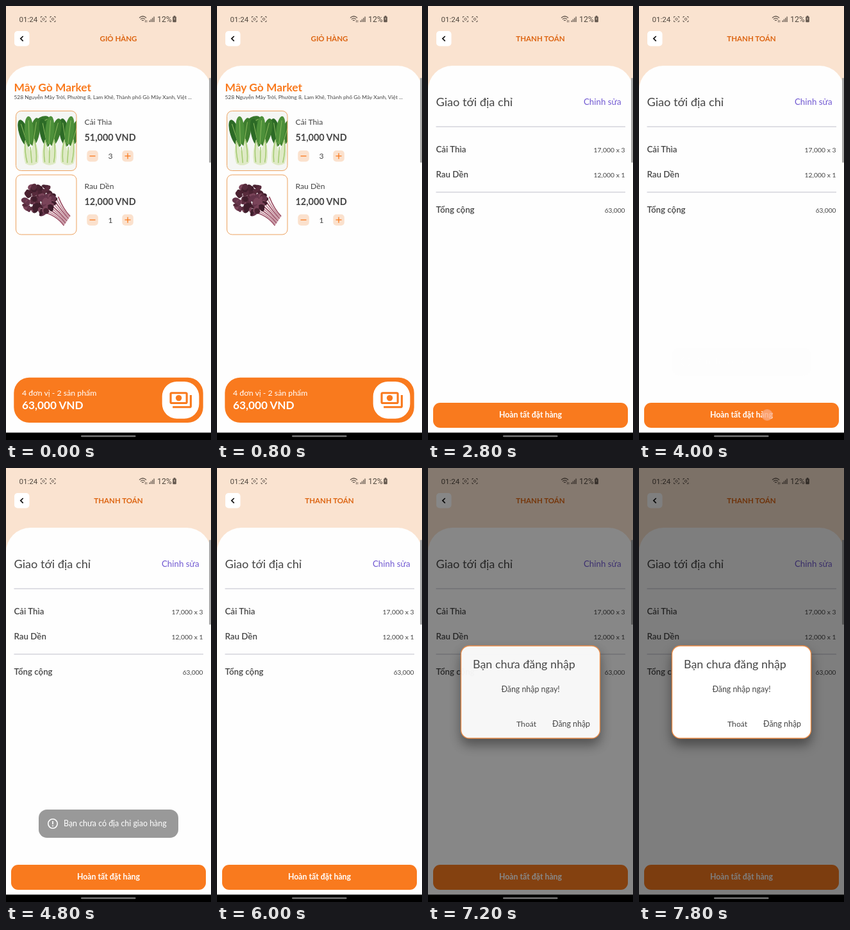
Recreate the animation shown at these times as an HTML page. Size 320 by 676 pixels, loop 8 s.

```html
<!DOCTYPE html>
<html lang="vi">
<head>
<meta charset="utf-8">
<title>Giỏ hàng</title>
<style>
  html, body { margin: 0; width: 100%; height: 100%; overflow: hidden; background: #000; }
  svg { display: block; width: 100vw; height: 100vh; }
  text { font-family: Lato, "Noto Sans", sans-serif; fill: #454545; }
  .status text { font-family: Roboto, sans-serif; fill: #51483f; }
  #dialog { filter: drop-shadow(0 10px 9px rgba(0, 0, 0, .42)); }
</style>
</head>
<body>
<svg id="stage" viewBox="0 0 320 676" preserveAspectRatio="none"></svg>
<script>
const LOOP = 8000;
const ORANGE = '#f97a1e', PEACH = '#fae3d0', TITLE = '#dd6512';

const rect = (x, y, w, h, r, fill, extra = '') =>
  `<rect x="${x}" y="${y}" width="${w}" height="${h}" rx="${r}" fill="${fill}" ${extra}/>`;
const line = (d, color, width, extra = '') =>
  `<path d="${d}" fill="none" stroke="${color}" stroke-width="${width}" ${extra}/>`;
const ellipse = (x, y, rx, ry, angle, fill) =>
  `<ellipse rx="${rx}" ry="${ry}" fill="${fill}" transform="translate(${x} ${y}) rotate(${angle})"/>`;

function label(str, x, y, size, { fill, weight = 400, anchor = 'start' } = {}) {
  const style = fill ? `style="fill:${fill}"` : '';
  return `<text x="${x}" y="${y}" font-size="${size}" font-weight="${weight}" text-anchor="${anchor}" ${style}>${str}</text>`;
}

function page(title, body) {
  return rect(0, 0, 320, 676, 0, PEACH) + rect(0, 93, 320, 640, 38, '#fefefe') +
    rect(13, 39, 23.5, 23.5, 5, '#fff') +
    line('M26.7 47 L22.8 50.8 L26.7 54.6', '#111', 1.7) +
    label(title, 175.5, 54.5, 11.5, { fill: TITLE, weight: 700, anchor: 'middle' }) + body;
}

function seeded(seed) {
  return () => (seed = (seed * 16807) % 2147483647) / 2147483647;
}

// Pictures are drawn inside a 95 x 93 box
function bokChoy() {
  const leaf = (x, y, rx, ry, angle, fill) => ellipse(x, y, rx, ry, angle, fill) +
    line(`M0 ${ry} V${-ry * .7}`, '#8bb95e', 1, `transform="translate(${x} ${y}) rotate(${angle})"`);
  const bunch = (x, lean) => `<g transform="translate(${x} 84) rotate(${lean})">` +
    leaf(-8, -50, 7.5, 22, -13, '#2c6a26') + leaf(9, -51, 7.5, 22, 14, '#3d7d2e') +
    leaf(0, -54, 7, 22, 3, '#4d903a') +
    '<path d="M-10 -3 Q-14 -20 -7 -40 Q-3 -24 0 -20 Q3 -26 7 -41 Q14 -20 10 -3 Q0 4 -10 -3Z" fill="#dfeac6"/>' +
    line('M-7 -4 Q-10 -22 -7 -38 M0 -3 V-28 M7 -4 Q10 -22 7 -38', '#a3ca70', 1.5) + '</g>';
  return rect(0, 0, 95, 93, 0, '#f5f6f4') + leaf(41, 17, 8, 13, 62, '#37772c') +
    bunch(25, -5) + bunch(80, 4) + bunch(52, 1);
}

function amaranth() {
  const rnd = seeded(73), tones = ['#4a2231', '#64344a', '#3f1d2b', '#7a4459', '#572a3b'];
  let out = '';
  for (let i = 0; i < 9; i++) {
    out += line(`M${42 + i * 3} ${58 - i * 3} Q${62 + i * 1.5} ${62 - i} ${75 + i * 1.2} ${79 - i * 1.8}`,
      i % 2 ? '#c28c99' : '#9a4c63', 1.7);
  }
  for (let i = 0; i < 85; i++) {
    const a = rnd() * 6.28, r = Math.sqrt(rnd());
    out += ellipse(36 + 24 * r * Math.cos(a), 39 + 23 * r * Math.sin(a),
      4 + 3 * rnd(), 2.5 + 2 * rnd(), rnd() * 180, tones[i % tones.length]);
  }
  return out;
}

function cartItem(y, name, price, count, picture) {
  const stepper = (x, d) => rect(x, y + 62, 17.5, 17.5, 5, '#fbe1cd') +
    line(d, ORANGE, 1.3, `transform="translate(${x + 8.7} ${y + 70.7})"`);
  return `<g transform="translate(15.5 ${y + .5})">` +
    `<g clip-path="url(#photo)">${picture}</g>` +
    rect(0, 0, 94.5, 93, 8, 'none', 'stroke="#eda361"') + '</g>' +
    label(name, 122.5, y + 22, 12.2) +
    label(price, 122.5, y + 47, 14.4, { weight: 700 }) +
    stepper(126.3, 'M-4.5 0 H4.5') + stepper(181.3, 'M-4.5 0 H4.5 M0 -4.5 V4.5') +
    label(count, 163, y + 75.3, 12.2, { anchor: 'middle' });
}

const banknotes = `<g transform="translate(253.9 594.9) scale(1.57)">` +
  rect(2, 5, 16, 10, 1, 'none', `stroke="${ORANGE}" stroke-width="2"`) +
  `<circle cx="10" cy="10" r="3" fill="${ORANGE}"/>` +
  line('M22 7 V18 Q22 19 21 19 H4', ORANGE, 2) + '</g>';

const cart = page('GIỎ HÀNG',
  label('Mây Gò Market', 12.5, 133, 17.4, { fill: ORANGE, weight: 700 }) +
  label('528 Nguyễn Mây Trời, Phường 8, Lam Khê, Thành phố Gò Mây Xanh, Việt ...', 12.5, 145.3, 8.4) +
  cartItem(163, 'Cải Thìa', '51,000 VND', 3, bokChoy()) +
  cartItem(262.5, 'Rau Dền', '12,000 VND', 1, amaranth()) +
  rect(12.3, 578.7, 295.4, 70.3, 24, ORANGE) +
  label('4 đơn vị - 2 sản phẩm', 25, 607, 12.3, { fill: '#fff' }) +
  label('63,000 VND', 25, 628, 17.2, { fill: '#fff', weight: 700 }) +
  rect(243.7, 585, 57.7, 57.7, 23, '#fff') + banknotes);

function summaryRow(name, amount, y, size) {
  return label(name, 12.5, y, 13.3, { weight: 600 }) +
    label(amount, 307.5, y - .5, size, { anchor: 'end' });
}

const checkout = page('THANH TOÁN',
  label('Giao tới địa chỉ', 12.5, 156, 18.2) +
  label('Chỉnh sửa', 301.5, 154, 13.3, { fill: '#7159d2', anchor: 'end' }) +
  line('M12.5 188 H308 M12.5 290 H308', '#d3d3dc', 1.3) +
  summaryRow('Cải Thìa', '17,000 x 3', 228, 10.4) +
  summaryRow('Rau Dền', '12,000 x 1', 267.3, 10.4) +
  summaryRow('Tổng cộng', '63,000', 322, 10.2) +
  rect(8, 618, 304, 39, 11, ORANGE) +
  label('Hoàn tất đặt hàng', 160, 641, 12.3, { fill: '#fff', weight: 700, anchor: 'middle' }));

function statusBar() {
  const ink = '#65594f';
  const capture = x => line('M-4 -2 V-4 H-2 M2 -4 H4 V-2 M4 2 V4 H2 M-2 4 H-4 V2', ink, 1, `transform="translate(${x} 20.5)"`) +
    `<circle cx="${x}" cy="20.5" r="1.7" fill="none" stroke="${ink}"/>`;
  const bars = [0, 1, 2, 3].map(i => rect(223.5 + i * 2.3, 22.5 - i * 2, 1.3, 2.5 + i * 2, 0, ink)).join('');
  return label('01:24', 20.5, 25, 11.6) + capture(58.5) + capture(73) +
    line('M208 18.5 Q213.5 13.5 219 18.5 M210 20.8 Q213.5 17.6 217 20.8 M212 22.8 Q213.5 21.4 215 22.8', ink, 1.2) +
    line('M217.5 22 V25.5 M219.7 25.5 V22', ink, .9) + bars +
    label('12%', 236, 24.8, 12.3) +
    rect(260.2, 16.5, 5.6, 8.8, 1, ink) + rect(261.7, 15.2, 2.6, 2, 0, ink) +
    line('M263 18.5 V21.5', PEACH, 1);
}

const toast = rect(51, 532, 218, 44, 13, '#999') +
  '<circle cx="73" cy="554" r="7.2" fill="none" stroke="#fff" stroke-width="1.6"/>' +
  line('M73 550 V555 M73 556.6 V558.2', '#fff', 1.7) +
  label('Bạn chưa có địa chỉ giao hàng', 90, 558, 12.4, { fill: '#fff' });

const dialog = rect(51.5, 277, 217, 144, 13, '#fff', 'stroke="#ee8c45" stroke-width="1.3"') +
  label('Bạn chưa đăng nhập', 70, 312, 17.9) +
  label('Đăng nhập ngay!', 160, 348.5, 12.4, { anchor: 'middle' }) +
  label('Thoát', 138, 403, 12.2) +
  label('Đăng nhập', 253, 403, 12.4, { anchor: 'end' });

const touch = (id, x, y, fill, stroke) =>
  `<circle id="${id}" cx="${x}" cy="${y}" r="8.3" fill="${fill}" stroke="${stroke}" stroke-width="1.2"/>`;
const group = (id, content) => `<g id="${id}">${content}</g>`;

const stage = document.getElementById('stage');
stage.innerHTML = `<clipPath id="photo">${rect(0, 0, 94.5, 93, 8, '#fff')}</clipPath>` +
  cart + group('checkout', checkout) +
  `<g class="status">${statusBar()}</g>` +
  rect(317, 112, 3, 132, 1, '#aaa') +
  group('toast', toast) +
  touch('tapCart', 197, 616, '#fcab82', '#f9a67c') +
  touch('tapOrder', 200, 637, '#fcab82', '#f9a67c') +
  touch('tapEdit', 283, 156, 'rgba(248,248,252,.72)', '#c3c3d2') +
  group('barrier', rect(0, 0, 320, 676, 0, '#000')) +
  group('dialog', dialog) +
  rect(0, 664.5, 320, 11.5, 0, '#000') + rect(117, 668.7, 85.5, 2.6, 1.3, '#777');

// Each step: [time in ms, value, easing towards the next step]
function play(id, property, steps) {
  const all = [[0, steps[0][1]], ...steps, [LOOP, steps[steps.length - 1][1]]];
  const frames = all.map(([ms, value, easing = 'linear']) => ({ offset: ms / LOOP, [property]: value, easing }));
  document.getElementById(id).animate(frames, { duration: LOOP, iterations: Infinity });
}

play('checkout', 'opacity', [[1650, 0, 'cubic-bezier(.42,0,1,1)'], [1950, 1]]);
play('checkout', 'transform', [[1650, 'translateY(169px)', 'cubic-bezier(.4,0,.2,1)'], [1950, 'translateY(0px)']]);
play('tapCart', 'opacity', [[1540, 0], [1580, 1], [1820, .9], [1900, 0]]);
play('tapOrder', 'opacity', [[3940, 0], [3980, .8], [4060, .8], [4160, 0]]);
play('toast', 'opacity', [[4000, 0], [4200, 1], [5500, 1], [5700, 0]]);
play('tapEdit', 'opacity', [[6920, 0], [6960, 1], [7060, 1], [7140, 0]]);
play('barrier', 'opacity', [[7080, 0, 'ease-out'], [7230, .5]]);
play('dialog', 'opacity', [[7080, 0, 'ease-out'], [7230, 1]]);
</script>
</body>
</html>
```
